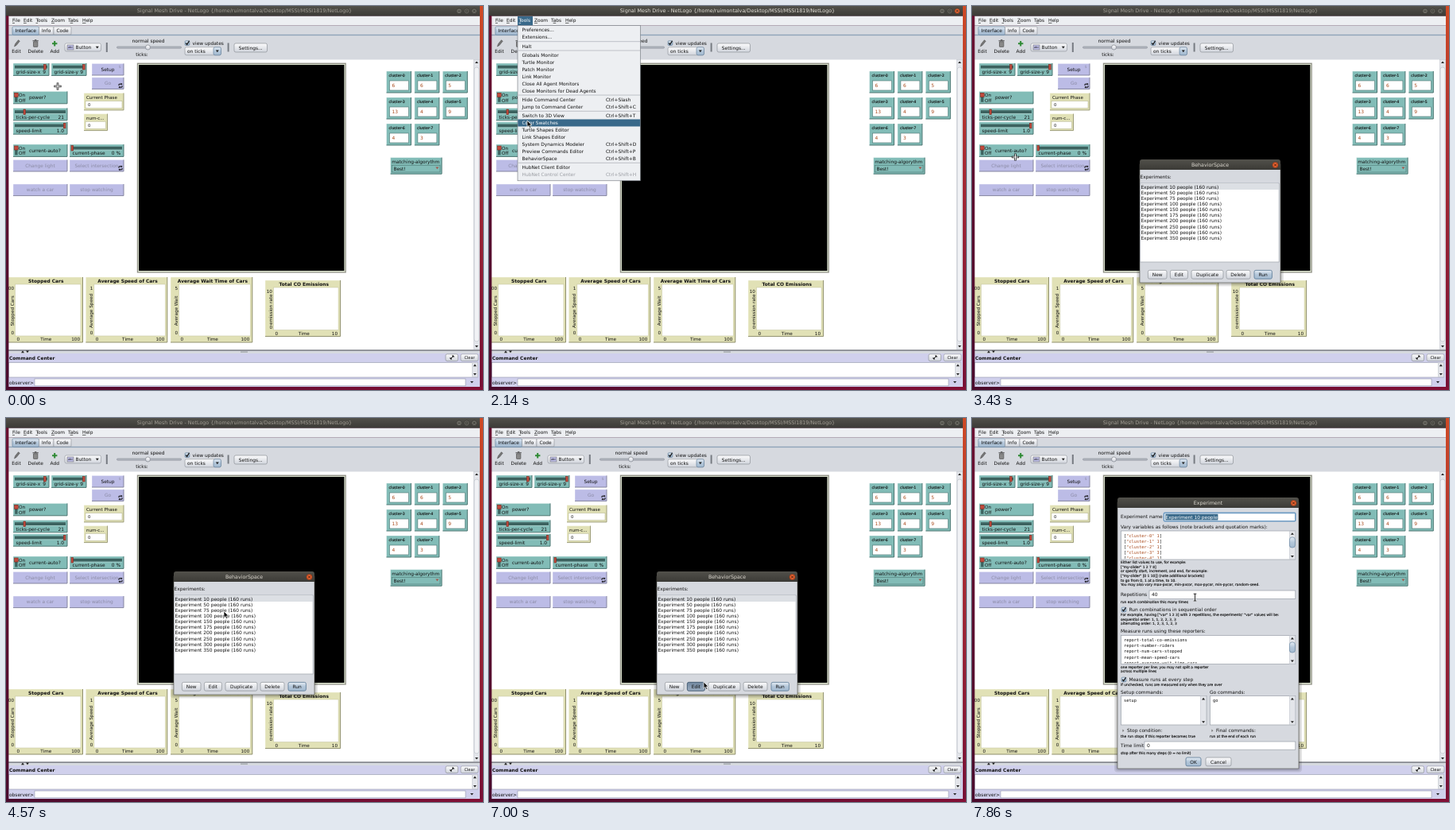
Animation of 600x483 px, one loop 8000 ms. Source, as an HTML page:

```html
<!DOCTYPE html>
<html lang="en">
<head>
<meta charset="utf-8">
<title>Simulation walkthrough</title>
<style>
html, body { margin: 0; width: 100%; height: 100%; overflow: hidden; background: #3a0b28; }
svg { display: block; width: 600px; height: 483px; }
text { font-family: "DejaVu Sans", sans-serif; text-rendering: geometricPrecision; white-space: pre; }
.mono { font-family: "DejaVu Sans Mono", monospace; }
.tiny { stroke: #111; stroke-width: .14px; }
.u { text-decoration: underline; }
</style>
</head>
<body>
<svg id="stage" viewBox="0 0 600 483" xmlns="http://www.w3.org/2000/svg">
  <defs>
    <linearGradient id="btn" x2="0" y2="1"><stop stop-color="#fbfbfc"/><stop offset=".5" stop-color="#e6e8ec"/><stop offset="1" stop-color="#d0d4dc"/></linearGradient>
    <linearGradient id="def" x2="0" y2="1"><stop stop-color="#e4ecf4"/><stop offset=".5" stop-color="#b3c6d9"/><stop offset="1" stop-color="#a3bad0"/></linearGradient>
    <linearGradient id="down" x2="0" y2="1"><stop stop-color="#71879f"/><stop offset="1" stop-color="#9aacc0"/></linearGradient>
    <linearGradient id="bar" x2="0" y2="1"><stop stop-color="#52514b"/><stop offset="1" stop-color="#3b3a36"/></linearGradient>
    <linearGradient id="wallL" x2="0" y2="1"><stop stop-color="#6a1030"/><stop offset="1" stop-color="#4a0a2c"/></linearGradient>
    <linearGradient id="wallR" x2="0" y2="1"><stop stop-color="#cf4a25"/><stop offset=".4" stop-color="#a82a33"/><stop offset="1" stop-color="#760f35"/></linearGradient>
    <linearGradient id="wallB"><stop stop-color="#4a0a2c"/><stop offset="1" stop-color="#820f35"/></linearGradient>
  </defs>
</svg>
<script>
const TEAL = '#82bcb7', LILAC = '#bcbce6', SAND = '#e1e1b6', PANEL = '#d6d9df',
      BLUE = '#39698a', BRICK = '#a8481a', EDGE = '#8e9299', FAINT = '#8c8ca6';
const stage = document.getElementById('stage');

// Markup helpers
const esc = s => s.replace(/&/g, '&amp;').replace(/</g, '&lt;');
const rect = (x, y, w, h, fill, stroke = 'none', r = 0, lw = .6) =>
  `<rect x="${x}" y="${y}" width="${w}" height="${h}" rx="${r}" fill="${fill}" stroke="${stroke}" stroke-width="${lw}"/>`;
const path = (d, fill, stroke = 'none', lw = .7) =>
  `<path d="${d}" fill="${fill}" stroke="${stroke}" stroke-width="${lw}"/>`;
const circle = (x, y, r, fill, stroke = 'none') =>
  `<circle cx="${x}" cy="${y}" r="${r}" fill="${fill}" stroke="${stroke}" stroke-width=".6"/>`;
const raw = (x, y, html, o = {}) =>
  `<text x="${x}" y="${y}" font-size="${o.s || 5.9}" fill="${o.c || '#111'}" text-anchor="${o.a || 'start'}"` +
  `${o.b ? ' font-weight="bold"' : ''}${o.k ? ` class="${o.k}"` : ''}${o.t ? ` transform="${o.t}"` : ''}>${html}</text>`;
const text = (x, y, s, o) => raw(x, y, esc(s), o);
const mid = (x, y, s, o) => text(x, y, s, { a: 'middle', ...o });
const end = (x, y, s, o) => text(x, y, s, { a: 'end', ...o });
const tri = (x, y, d, fill = '#222') =>
  path(`M${x - 2} ${y - d}h4l-2 ${2.6 * d}z`, fill);
const group = html => {
  const g = document.createElementNS(stage.namespaceURI, 'g');
  g.innerHTML = html;
  stage.append(g);
  return g;
};

// Shared controls
const bevel = (x, y, w, h, fill, dark) =>
  rect(x, y, w, h, fill) + path(`M${x} ${y + h}V${y}H${x + w}`, 'none', '#ffffff80', .8) +
  path(`M${x} ${y + h}H${x + w}V${y}`, 'none', dark, 1);
const button = (x, y, w, h, s, fill = 'url(#btn)', stroke = EDGE) =>
  rect(x, y, w, h, fill, stroke, 2, .7) + mid(x + w / 2, y + h / 2 + 2.1, s);
const field = (x, y, w, h) => rect(x, y, w, h, '#fff', '#9aa0aa', 0, .7);
const vbar = (x, y, h, thumbY, thumbH) =>
  rect(x, y, 7, h, '#e3e5ea', '#c2c6cd') + tri(x + 3.5, y + 3.6, -1) + tri(x + 3.5, y + h - 3.6, 1) +
  (thumbH ? rect(x, thumbY, 7, thumbH, 'url(#def)', '#5a7a98', 3) : '');
const check = (x, y) =>
  rect(x - 2.8, y - 2.8, 5.6, 5.6, 'url(#def)', '#4a6c8c', 1) +
  path(`M${x - 1.8} ${y}l1.5 1.8l2.8 -4.6`, 'none', '#111', 1.2);

// Model widgets
const slider = (x, y, w, name, val, pos) =>
  bevel(x, y, w, 15.4, TEAL, '#4a7470') + rect(x + 2, y + 2.8, w - 4, 4, '#3c625f') +
  path(`M${x + 2} ${y + 7.1}h${w - 4}`, 'none', '#b7dad6', .7) +
  rect(pos, y + 1.6, 2.6, 6.4, '#c24a3c', '#7c2a22') +
  text(x + 3.5, y + 13.2, name) + end(x + w - 4, y + 13.2, val);
const toggle = (x, y, name) =>
  bevel(x, y, 68, 15.4, TEAL, '#4a7470') + rect(x + 2.2, y + 2, 3.4, 11.4, '#3c625f') +
  rect(x + 1.6, y + 2, 4.6, 5, '#c24a3c', '#7c2a22') +
  text(x + 7, y + 7, 'On', { s: 5.7 }) + text(x + 7, y + 13.4, 'Off', { s: 5.7 }) + text(x + 20, y + 10, name);
const loopMark = (x, y) =>
  path(`M${x - 2} ${y}v-2h3.4M${x + 2} ${y}v2h-3.4`, 'none', '#111', 1) +
  path(`M${x + .6} ${y - 3.4}l2 1.4l-2 1.4zM${x - .6} ${y + 3.4}l-2 -1.4l2 -1.4z`, '#111');
const action = (x, y, w, s, on, forever) =>
  bevel(x, y, w, 14.6, LILAC, '#85859f') + mid(x + w / 2, y + 9.4, s, { c: on ? '#111' : FAINT }) +
  (forever ? loopMark(x + w - 4, y + 10.4) : '');
const monitor = (x, y, w, h, s) =>
  bevel(x, y, w, h, SAND, '#9c9c78') + text(x + 3, y + 7.6, s, { s: 5.5 }) +
  rect(x + 2, y + h - 11.4, w - 4, 9.2, '#fff', '#b9b993') + text(x + 5, y + h - 4.8, '0', { s: 5.2 });
const input = (i, val) => {
  const x = 478.5 + i % 3 * 35.4, y = 82 + Math.floor(i / 3) * 33;
  return bevel(x, y, 31, 27, TEAL, '#4a7470') + text(x + 3, y + 6.8, 'cluster-' + i, { s: 4.7, k: 'tiny' }) +
    rect(x + 4, y + 12, 24, 12, '#fff', '#4a7470') + text(x + 7, y + 20.2, val, { c: BRICK });
};
const plot = (x, y, w, h, title, yName, top, xMax) => {
  const cx = x + w / 2 + 1.5, my = y + h / 2 + 1.5, s = { s: 5.7 };
  return bevel(x, y, w, h, SAND, '#8f8f6c') + rect(x + 10.5, y + 9, w - 13, h - 17, '#fff', '#c9c9a4') +
    mid(cx, y + 7, title, { b: 1 }) + end(x + 9, y + 16, top, s) + end(x + 9, y + h - 10, '0', s) +
    mid(0, 0, yName, { s: 5.7, t: `translate(${x + 8.6} ${my}) rotate(-90)` }) +
    text(x + 12.5, y + h - 1.9, '0', s) + mid(cx, y + h - 1.9, 'Time', s) + end(x + w - 3.5, y + h - 1.9, xMax, s);
};

// Window chrome
const dialogFrame = (x, y, w, h, title) =>
  [4, 2.5, 1].map(d => rect(x - d, y - d + 1.5, w + 2 * d, h + 2 * d - 1, '#00000018', 'none', 4)).join('') +
  rect(x, y + 6, w, h - 6, PANEL, '#55544e') +
  path(`M${x} ${y + 13}v-10q0 -3 3 -3h${w - 6}q3 0 3 3v10z`, 'url(#bar)') +
  mid(x + w / 2, y + 9, title, { s: 6.3, c: '#dfdbd2' }) +
  circle(x + w - 6.5, y + 7, 3.6, '#e2602f', '#7e2f14') +
  path(`M${x + w - 8} ${y + 5.5}l3 3m0 -3l-3 3`, 'none', '#3a1a0e', .8);
const titleBar = (fg, close) =>
  rect(0, 0, 600, 12.5, 'url(#bar)') +
  mid(300, 8.4, 'Signal Mesh Drive - NetLogo {/home/ruimontalva/Desktop/MSSI/MSSI1819/NetLogo}', { s: 6.4, c: fg }) +
  circle(570, 6.3, 3.4, '#6a6962', '#33322e') + circle(579.5, 6.3, 3.4, '#6a6962', '#33322e') +
  circle(589, 6.3, 3.4, close, '#33322e') +
  path('M568.5 6.3h3M578.2 5h2.6v2.6h-2.6zM587.6 4.9l2.8 2.8m0 -2.8l-2.8 2.8', 'none', '#2c2b28', .7);

const menuNames = [[8, 'File'], [22, 'Edit'], [37.5, 'Tools'], [57, 'Zoom'], [78, 'Tabs', 1], [96, 'Help']];
const menuLabel = ([x, s, u = 0], c) =>
  raw(x, 20.4, `${s.slice(0, u)}<tspan class="u">${s[u]}</tspan>${s.slice(u + 1)}`, { c });

const toolbar = () =>
  rect(3, 12.5, 593, 12, '#edeff2') + menuNames.map(m => menuLabel(m)).join('') +
  rect(3, 24.5, 593, 43, PANEL) + rect(3, 35.8, 593, 1.4, '#8fa3b8') +
  rect(8, 26, 33.5, 10.4, 'url(#def)', '#5a7a98', 1.5) + mid(24.7, 33.2, 'Interface') +
  rect(41.5, 26, 18.5, 10, 'url(#btn)', EDGE, 1) + mid(50.7, 33.2, 'Info') +
  rect(60, 26, 22, 10, 'url(#btn)', EDGE, 1) + mid(71, 33.2, 'Code') +
  path('M10.5 51l1 -3.2l4 -5l1.8 1.4l-4 5z', '#777', '#444', .5) + mid(13, 59.4, 'Edit') +
  rect(34.5, 44.8, 5.4, 6.6, '#888', '#444', .6) + path('M33.5 43.8h7.4M36 42.8h2.4', 'none', '#444', 1) + mid(37.3, 59.4, 'Delete') +
  path('M58 47.3h6.4M61.2 44.1v6.4', 'none', '#2f8a35', 2) + mid(61.2, 59.4, 'Add') +
  rect(74, 47, 45.5, 10, 'url(#btn)', EDGE, 2) + rect(77, 49, 8, 6, LILAC, '#777') + mid(81, 53.4, 'abc', { s: 3.4 }) +
  text(87.6, 54.2, 'Button') + tri(114.8, 51.8, 1) +
  rect(125.8, 46, 2, 12, '#777b82') + rect(278.6, 46.5, 2, 11, '#777b82') +
  mid(179, 45.8, 'normal speed', { s: 6 }) + rect(139.5, 51, 81, 2.2, '#b4b9c2', '#878c95', 1) +
  circle(178.5, 52, 3, 'url(#btn)', '#6f757e') + mid(171, 62.6, 'ticks:') +
  check(228, 46.6) + text(234.6, 48.7, 'view updates') +
  rect(225, 51.8, 45.5, 10, 'url(#btn)', EDGE, 2) + rect(261, 51.8, 9.5, 10, 'url(#def)', '#5a7a98', 2) +
  text(228, 59, 'on ticks') + tri(265.8, 56.6, 1) + button(287, 47, 41.5, 11, 'Settings...');

const world = () =>
  rect(164.8, 71.6, 263, 264, '#8f8f85') + rect(166, 73, 260.6, 261.4, '#dfe6d2') + rect(167, 74, 258.4, 259, '#000');

const widgets = () =>
  slider(9, 72, 45, 'grid-size-x', '9', 47.6) + slider(57, 72, 44, 'grid-size-y', '9', 96.6) +
  action(108, 72.4, 40, 'Setup', 1) + text(141.8, 77.8, 'S', { s: 4.4, c: FAINT }) + action(108, 89.8, 40, 'Go', 0, 1) +
  toggle(9, 107.4, 'power?') + monitor(98, 109.5, 50, 21.4, 'Current Phase') + monitor(98, 135.6, 29.5, 21, 'num-c...') +
  slider(9, 128.4, 68, 'ticks-per-cycle', '21', 22) + slider(9, 145.8, 68, 'speed-limit', '1.0', 72.4) +
  toggle(9, 174, 'current-auto?') + slider(80, 174, 68, 'current-phase', '0 %', 82) +
  action(9, 193.4, 68, 'Change light') + action(80, 193.4, 68, 'Select intersection', 0, 1) +
  action(9, 224, 68, 'watch a car') + action(80, 224, 68, 'stop watching') +
  ['6', '6', '5', '13', '4', '9', '4', '3'].map((v, i) => input(i, v)).join('') +
  bevel(483.6, 190.6, 64.5, 20.6, TEAL, '#4a7470') + text(485.2, 198.2, 'matching-algorythm') +
  rect(485.4, 200.2, 60.6, 8.8, TEAL, '#4a7470') + text(487.4, 206.6, 'Best!') + tri(542.4, 203.6, 1, '#a4574c') +
  plot(1, 341, 95.5, 82, 'Stopped Cars', 'Stopped Cars', '100', '100') +
  plot(100.3, 341, 102.5, 82, 'Average Speed of Cars', 'Average Speed', '1', '100') +
  plot(207, 341, 102.8, 82, 'Average Wait Time of Cars', 'Average Wait', '5', '100') +
  plot(326, 345, 94.6, 70.6, 'Total CO Emissions', 'emission rate', '10', '10');

const commandCenter = () =>
  rect(3, 432, 593, 5, PANEL) + rect(3, 432.6, 593, 1, '#55555d') +
  tri(21, 435.2, -1) + tri(27, 434.6, 1) + rect(295, 434.6, 9, 1, '#8e9299') +
  rect(3, 437, 593, 42, '#d0d0ec') + text(4, 444.6, 'Command Center', { b: 1 }) +
  button(553, 437.8, 15.5, 8.8, '') + path('M559 444l4 -4m0 0h-2m2 0v2M559 444h2m-2 0v-2', 'none', '#111', 1) +
  rect(572, 437.8, 22, 8.8, 'url(#btn)', EDGE, 2) + mid(583, 444, 'Clear', { s: 5 }) +
  rect(3.5, 448.4, 590, 18.6, '#fff', '#8f93a8') + vbar(586.3, 448.6, 18, 0, 0) +
  text(4, 475.6, 'observer>') + rect(36, 469, 542, 8.8, '#fff', '#8f93a8') + tri(586, 473, 1);

group(rect(3, 67, 593, 366, '#fff') + toolbar() + world() + widgets() +
  rect(588.4, 67.5, 7.4, 364.5, '#e3e5ea', '#c2c6cd') + rect(589, 77, 6, 345, '#f1f2f5', '#b9bec7', 3) +
  tri(592, 71, -1) + tri(592, 428, 1) + commandCenter());
const idleTitle = group(titleBar('#a19d94', '#6a6962'));
const liveTitle = group(titleBar('#e4e0d7', '#e2602f'));
group(rect(0, 12.5, 3.4, 470.5, 'url(#wallL)') + rect(596, 0, 4, 483, 'url(#wallR)') + rect(0, 479, 600, 4, 'url(#wallB)'));

// Tools menu: name, then shortcut; null starts a new section
const items = [['Preferences...'], ['Extensions...'], null, ['Halt'], null,
  ['Globals Monitor'], ['Turtle Monitor'], ['Patch Monitor'], ['Link Monitor'],
  ['Close All Agent Monitors'], ['Close Monitors for Dead Agents'], null,
  ['Hide Command Center', 'Ctrl+Slash'], ['Jump to Command Center', 'Ctrl+Shift+C'], null,
  ['Switch to 3D View', 'Ctrl+Shift+T'], ['Color Swatches'], ['Turtle Shapes Editor'], ['Link Shapes Editor'],
  ['System Dynamics Modeler', 'Ctrl+Shift+D'], ['Preview Commands Editor', 'Ctrl+Shift+P'],
  ['BehaviorSpace', 'Ctrl+Shift+B'], null, ['HubNet Client Editor'], ['HubNet Control Center', 'Ctrl+Shift+H']];
const rows = [];
let rowY = 30.2, menuHtml = rect(36, 24.4, 154.4, 195.4, '#edeff2', '#6d7178') +
  rect(36, 13, 19, 11.2, BLUE) + menuLabel(menuNames[2], '#fff');
for (const it of items) {
  if (!it) {
    menuHtml += path(`M36.5 ${rowY - 3.4}H190`, 'none', '#a9adb5', .7);
    rowY += 2.35;
    continue;
  }
  rows.push(rowY);
  const c = it[0] === 'HubNet Control Center' ? '#9a9da3' : '#111';
  menuHtml += `<g class="item">${rect(36.3, rowY - 4.5, 153.8, 9, 'none')}${text(41.5, rowY + 2.1, it[0], { c })}` +
    `${it[1] ? text(147, rowY + 2.1, it[1], { c }) : ''}</g>`;
  rowY += 8.95;
}
const menu = group(menuHtml);
const itemNodes = [...menu.querySelectorAll('.item')];

// Experiment list
const sizes = [10, 50, 75, 100, 150, 175, 200, 250, 300, 350];
const listBox = group(dialogFrame(211, 193, 177, 155, 'BehaviorSpace') +
  text(211.6, 217, 'Experiments:') + field(211.6, 223, 174.6, 99) + rect(212, 223.8, 173.8, 7.2, '#dcdfe4') +
  sizes.map((n, i) => text(212.4, 229.7 + i * 7.12, `Experiment ${n} people (160 runs)`)).join('') +
  button(221.4, 332.4, 23.6, 10.8, 'New') + button(249.4, 332.4, 22, 10.8, 'Edit') +
  button(276, 332.4, 40, 10.8, 'Duplicate') + button(320, 332.4, 30, 10.8, 'Delete') +
  button(355, 332.4, 22.4, 10.8, 'Run', 'url(#def)', '#4a6c8c'));
const pressed = group(button(249.4, 332.4, 22, 10.8, 'Edit', 'url(#down)', '#2f4b66'));

// Experiment editor
const note = (x, y, s) => text(x, y, s, { s: 4.42, k: 'tiny' });
const bracket = s => esc(s).replace(/[[\]]/g, '<tspan fill="#111">$&</tspan>');
const code = (x, y, s, c) => raw(x, y, bracket(s), { s: 5.3, k: 'mono', c });
const clipped = (x, y, w, h, html) => `<svg x="${x}" y="${y}" width="${w}" height="${h}" viewBox="${x} ${y} ${w} ${h}">${html}</svg>`;
const area = (x, y, w, h, lines, c) =>
  field(x, y, w, h) + clipped(x, y, w, h - 1, lines.map((s, i) => code(x + 3.6, y + 7.6 + i * 7.1, s, c)).join(''));
const notes = (y, step, ...lines) => lines.map((s, i) => note(187, y + i * step, s)).join('');
const editor = group(dialogFrame(183, 100, 228, 341, 'Experiment') +
  text(187, 126.4, 'Experiment name') + rect(241.4, 119.4, 165.4, 10.4, '#fff', '#6f9cc4', 1, 1.6) +
  rect(243.4, 120.8, 66, 7.6, BLUE) + text(243.6, 126.6, 'Experiment 10 people', { c: '#fff' }) +
  text(187, 138.8, 'Vary variables as follows (note brackets and quotation marks):') +
  area(187.4, 142, 219.4, 36, [1, 1, 1, 3, 1].map((n, i) => `["cluster-${i}" ${n}]`), BRICK) +
  vbar(399.4, 142.2, 35.4, 150, 13) +
  notes(183, 5.65, 'Either list values to use, for example:', '["my-slider" 1 2 7 8]',
    'or specify start, increment, and end, for example:', '["my-slider" [0 1 10]] (note additional brackets)',
    'to go from 0, 1 at a time, to 10.',
    'You may also vary max-pxcor, min-pxcor, max-pycor, min-pycor, random-seed.') +
  text(187, 224, 'Repetitions') + field(223, 217, 183.8, 10.4) + text(226, 224.2, '40') +
  notes(232.6, 0, 'run each combination this many times') +
  check(191, 241) + text(197.4, 243.1, 'Run combinations in sequential order') +
  notes(249, 5.65, 'For example, having ["var" 1 2 3] with 2 repetitions, the experiments\' "var" values will be:',
    'sequential order: 1, 1, 2, 2, 3, 3', 'alternating order: 1, 2, 3, 1, 2, 3') +
  text(187, 270.4, 'Measure runs using these reporters:') +
  area(187.4, 273.6, 219.4, 36, ['report-total-co-emissions', 'report-number-riders', 'report-num-cars-stopped',
    'report-mean-speed-cars', 'report-average-wait-time-cars']) +
  vbar(399.4, 273.8, 35.4, 282, 13) +
  notes(314.6, 5.65, 'one reporter per line; you may not split a reporter', 'across multiple lines') +
  check(191, 329) + text(197.4, 331.2, 'Measure runs at every step') +
  notes(337.4, 0, 'if unchecked, runs are measured only when they are over') +
  text(187, 347.4, 'Setup commands:') + text(299, 347.4, 'Go commands:') +
  area(187.4, 349.6, 107.6, 36.4, ['setup']) + vbar(287.6, 349.8, 36, 0, 0) +
  area(299.4, 349.6, 107.4, 36.4, ['go']) + vbar(399.4, 349.8, 36, 0, 0) +
  [187, 299].map(x => path(`M${x + 2.4} 391.4l2 1.8l-2 1.8z`, '#777')).join('') +
  text(195, 395.4, 'Stop condition:') + text(307, 395.4, 'Final commands:') +
  note(187, 402, 'the run stops if this reporter becomes true') + note(299, 402, 'run at the end of each run') +
  text(187, 414, 'Time limit') + field(217, 407, 189.8, 10.2) + text(220, 414.2, '0') +
  notes(422.8, 0, 'stop after this many steps (0 = no limit)') +
  button(269, 427, 19, 10.8, 'OK', 'url(#def)', '#4a6c8c') + button(294, 427, 32, 10.8, 'Cancel'));

// Pointers
const cross = 'M-4.6 0h9.2M0 -4.6v9.2', beam = 'M-1.8 -4.4h3.6M0 -4.4v8.8M-1.8 4.4h3.6';
const pointers = {
  cross: group(path(cross, 'none', '#222', 2.6) + path('M-3.8 0h7.6M0 -3.8v7.6', 'none', '#fff', 1)),
  arrow: group(path('M0 0v8.2l1.9 -1.7l1.4 3l1.5 -.7l-1.4 -2.9h2.6z', '#111', '#fff', .7)),
  beam: group(path(beam, 'none', '#fff', 1.8) + path(beam, 'none', '#111', .9))
};

// Pointer track: step, x, y, and the shape from there on
const track = [
  [0, 65, 101, 'cross'], [1, 79, 92], [2, 91, 60, 'arrow'], [3, 62, 36], [4, 28, 23], [5, 37, 22], [6, 37, 22],
  [7, 38.5, 21.6], [10, 38.5, 21.6], [11, 40, 32], [17, 52, 200], [18, 53, 196], [20, 54, 189], [22, 54, 189, 'cross'],
  [24, 54.5, 190], [26, 150, 218], [27, 213, 236, 'arrow'], [29, 270, 243], [30, 270, 250], [31, 270, 250],
  [32, 274, 243], [35, 285, 230], [39, 285, 230], [40, 275, 279], [41, 266, 312], [42, 262, 338], [43, 292, 345],
  [44, 283, 333], [45, 283, 333], [47, 270, 332], [52, 270, 332], [55, 280.5, 225.6, 'beam']
];
function pointerAt(k) {
  let i = track.length - 1;
  while (track[i][0] > k) i--;
  const a = track[i], b = track[i + 1] || a, p = a === b ? 0 : (k - a[0]) / (b[0] - a[0]);
  const shape = track.slice(0, i + 1).reverse().find(r => r[3])[3];
  return { x: a[1] + (b[1] - a[1]) * p, y: a[2] + (b[2] - a[2]) * p, shape };
}

const show = (node, on) => { node.style.display = on ? '' : 'none'; };
const LOOP = 8000, STEPS = 56;
let last = -1;

function draw(k) {
  const p = pointerAt(k), open = k >= 10 && k < 23, live = k >= 10 && k < 24;
  show(idleTitle, !live);
  show(liveTitle, live);
  show(menu, open);
  show(listBox, k >= 24);
  show(pressed, k >= 49);
  show(editor, k >= 52);
  itemNodes.forEach((n, i) => {
    const on = open && Math.abs(p.y + 1.4 - rows[i]) <= 4.47;
    n.firstChild.setAttribute('fill', on ? BLUE : 'none');
    n.querySelectorAll('text').forEach(t => { t.style.fill = on ? '#fff' : ''; });
  });
  for (const s in pointers) {
    show(pointers[s], s === p.shape);
    pointers[s].setAttribute('transform', `translate(${p.x} ${p.y})`);
  }
}

// Seven pictures a second
const start = performance.now();
function tick(now) {
  const t = Math.max(0, now - start) % LOOP;
  const k = Math.floor((t + 5) * STEPS / LOOP) % STEPS;
  if (k !== last) draw(last = k);
  requestAnimationFrame(tick);
}
draw(0);
requestAnimationFrame(tick);
</script>
</body>
</html>
```
